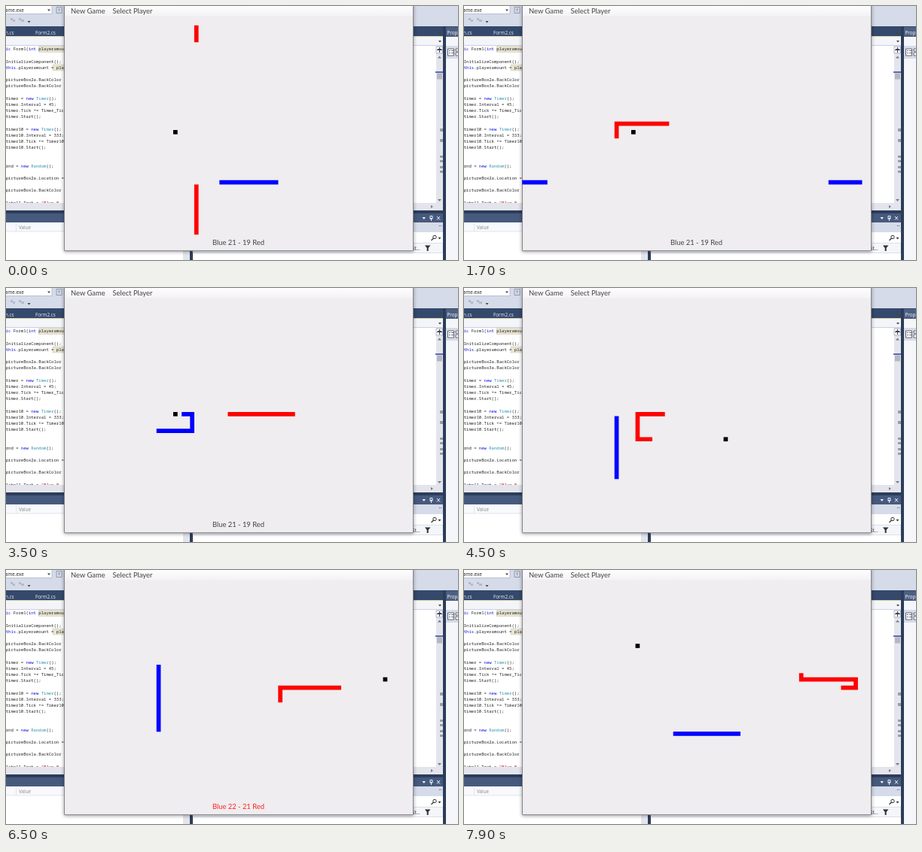
Recreate the animation shown at these times as an HTML page. Size 600 by 338 pixels, loop 8000 ms.

```html
<!DOCTYPE html>
<html lang="en">
<head>
<meta charset="utf-8">
<title>Two-player snake</title>
<style>
html, body { margin: 0; height: 100%; overflow: hidden; background: #fff; }
svg { display: block; width: 600px; height: 338px; }
text { white-space: pre; }
.code { font: 5.6px "Noto Sans Mono", "DejaVu Sans Mono", monospace; fill: #222; }
.ide { font: 6.3px "Open Sans", "Noto Sans", sans-serif; }
.app { font: 9.4px Lato, sans-serif; fill: #444; }
.kw { fill: #11d; } .type { fill: #2b91af; } .str { fill: #a31515; }
</style>
</head>
<body>
<svg viewBox="0 0 600 338">
  <defs>
    <filter id="blur" x="-10%" y="-10%" width="120%" height="120%"><feGaussianBlur stdDeviation="2.500"/></filter>
    <linearGradient id="menu" x2="0" y2="1"><stop stop-color="#fdfdfe"/><stop offset="1" stop-color="#f3f3f6"/></linearGradient>
  </defs>

  <!-- toolbar, tab strip, navigation bar -->
  <path fill="#d6dbe9" d="M0 0h600v27H0z"/>
  <path fill="#fff" stroke="#a5adc0" stroke-width=".7" d="M-2-2H61V10.500H-2z"/>
  <path fill="#34496b" d="M0 27h600v13.500H0z"/>
  <path fill="#f4f5f9" d="M0 41h580v12H0z"/>
  <path fill="#efe8c0" d="M0 40.300h580v1H0z"/>
  <path stroke="#c4cad8" stroke-width=".8" d="M0 52.500H580"/>
  <g class="ide">
    <text x="-1" y="8" fill="#222">ame.exe</text>
    <text x="-1" y="38" fill="#eef">n.cs</text>
    <text x="39" y="38" fill="#eef">Form2.cs</text>
  </g>
  <path fill="#b5bac8" d="M6 16h3v3H6zM9 18h3v3H9zM17 16h3v3h-3zM20 18h4v3h-4z"/>
  <path fill="none" stroke="#8c93a6" stroke-width=".9" d="M67 1.500h7v8h-7zm2 2.500h3m-1.500 0v3.500"/>
  <path fill="#444" d="M55 4.500h4l-2 2.500zM28.500 20h4l-2 2.500zM574 35h5l-2.500 3zM574 46h4l-2 2.500z"/>

  <!-- editor -->
  <path fill="#fff" d="M0 53h571v209H0z"/>
  <path fill="#e8e4d2" stroke="#c9c4ae" stroke-width=".5" d="M43.500 53.500h40v8h-40zM62 78h30v8H62z"/>
  <g id="code" class="code"></g>
  <path fill="#e4e5ec" d="M571 53h9v209h-9zM0 262h580v10H0z"/>
  <path fill="#f4f5f9" stroke="#8590a8" stroke-width=".6" d="M571 54h8.500v9H571z"/>
  <path stroke="#334" stroke-width=".9" d="M572 58.500h7M575.500 55v7M573 57.500h5"/>
  <path fill="#777b88" d="M573 69.500h5l-2.500-3zM573 257h5l-2.500 3zM564 265l3 2-3 2z"/>
  <path fill="#2434a0" d="M570 87.300h10v1.400h-10z"/>
  <path fill="#b4b7c2" d="M572 89.500h7v8h-7z"/>
  <path fill="#9a9ca6" d="M576 163h4v4h-4zM576 177h4v4h-4zM576 199h4v3h-4zM576 205h4v3h-4zM576 213h4v3h-4zM576 219h4v3h-4z"/>

  <!-- lower panes -->
  <path fill="#2c3d5b" d="M0 272h600v4H0z"/>
  <path fill="#465a7d" d="M0 276h580v12H0z"/>
  <path fill="#fff" d="M0 288h580v50H0z"/>
  <path fill="#f8f9fc" d="M0 288h244v12H0z"/>
  <path stroke="#d9dce5" stroke-width=".7" d="M0 300H244M13.500 289v11"/>
  <text class="ide" x="17" y="297" fill="#888">Value</text>
  <path fill="#e4e5ec" d="M235 300h9v38h-9z"/>
  <path fill="#2c3d5b" d="M244 272h4v66h-4z"/>
  <path fill="#d6dbe9" d="M248 288h332v13H248z"/>
  <path fill="#f5f6fa" stroke="#d0d4e0" stroke-width=".7" d="M248 315.500h332v13H248z"/>
  <g stroke="#eef" fill="none"><path d="M562.500 283h4m-2 0v3m-1.500-6.500v3h3v-3zM572 280l4 4.500m0-4.500l-4 4.500"/></g>
  <path fill="#eef" d="M552.500 281h4.500l-2.200 3z"/>
  <path stroke="#555" stroke-dasharray="1" d="M575 292.500h4"/>
  <circle cx="569" cy="307.500" r="2.200" fill="none" stroke="#333"/>
  <path stroke="#333" stroke-width="1.300" d="M567.500 309l-3 3"/>
  <path fill="#333" d="M573.500 308h4l-2 2.500zM556 318.500h7.500l-2.800 3.500v4h-2v-4z"/>
  <text class="ide" x="539" y="325" fill="#333">St...</text>

  <!-- properties pane -->
  <path fill="#2c3d5b" d="M580 27h4v311h-4z"/>
  <path fill="#4d6082" d="M584 28h16v13h-16z"/>
  <text class="ide" x="585.500" y="38" fill="#fff">Properties</text>
  <path fill="#f5f6fa" d="M584 41h16v297h-16z"/>
  <path fill="#d6dbe9" d="M584 53h16v17h-16z"/>
  <path fill="#fff" stroke="#445" stroke-width=".8" d="M586.500 57h8v9h-8zM588 59.500h2m1 0h3m-6 3h2m1 0h3M597 57h5v3h-5zm0 5h5v4h-5z"/>

  <!-- game window -->
  <path fill="#000" opacity=".4" filter="url(#blur)" d="M77-9h464v336H77z"/>
  <path fill="#efedef" stroke="#85868c" d="M77.500-9h463v334.700h-463z"/>
  <path fill="url(#menu)" d="M78 0h462v13.500H78z"/>
  <g class="app">
    <text x="86" y="9.500">New Game</text>
    <text x="141.500" y="9.500">Select Player</text>
    <text id="score" x="308.500" y="317.500" text-anchor="middle"></text>
  </g>
  <path id="food" fill="#000"/>
  <path id="blue" fill="#00f"/>
  <path id="red" fill="#f00"/>
</svg>
<script>
const $ = id => document.getElementById(id);

// Each entry: line number, then text
const lines = [
  [0, 'ic Form1(int playeramount)'], [2, 'InitializeComponent();'], [3, 'this.playeramount = playeramount;'],
  [5, 'pictureBox2a.BackColor ='], [6, 'pictureBox3a.BackColor ='],
  [8, 'timer = new Timer();'], [9, 'timer.Interval = 45;'], [10, 'timer.Tick += Timer_Tick;'], [11, 'timer.Start();'],
  [13, 'timer10 = new Timer();'], [14, 'timer10.Interval = 333;'], [15, 'timer10.Tick += Timer10_Tick;'], [16, 'timer10.Start();'],
  [19, 'rnd = new Random();'], [21, 'pictureBox2a.Location ='], [23, 'pictureBox1a.BackColor ='], [25, 'label1.Text = "Blue 0 - 0 Red";']
];
const paint = s => s.replace(/".*"|\b(?:int|this|new|ic)\b|\b(?:Timer|Random)(?=\()/g, w =>
  `<tspan class="${w[0] === '"' ? 'str' : /^[TR]/.test(w) ? 'type' : 'kw'}">${w}</tspan>`);
$('code').innerHTML = lines.map(([n, s]) =>
  `<text x="-.3" y="${59.2 + n * 8.18}">${paint(s)}</text>`).join('');

const LOOP = 8000, FRAME = 100, TICK = 46.85, PHASE = .7, BLINK = 343.75;
const CELL = 5.57, LEAD = 16;

// Unrolls moves such as "U26 L9" into the cells the head visits
function walk(x, y, moves) {
  const cells = [[x, y]];
  for (const move of moves.split(' ')) {
    for (let n = +move.slice(1); n--;) {
      if (move[0] === 'R') x = (x + 1) % 81;
      if (move[0] === 'L') x = (x + 80) % 81;
      if (move[0] === 'U') y = y > 2 ? y - 1 : 51;
      if (move[0] === 'D') y = y < 50 ? y + 1 : 1;
      cells.push([x, y]);
    }
  }
  return cells;
}
const redPath = walk(31, 6, 'U26 L9 U5 R33 D2 L28 D6 R24 U8 R28 U2 L13 U1');
const bluePath = walk(34, 39, 'R56 U8 R21 U4 L8 D59 R29');
const foods = [[26, 27], [48, 33], [62, 25], [76, 23], [27, 15]];
const meals = [77, 114, 136, 158];   // blue eats first, red the rest

const draw = (id, cells) => $(id).setAttribute('d', cells.map(([x, y]) =>
  `M${(77.2 + x * CELL).toFixed(2)} ${(14.6 + y * CELL).toFixed(2)}h5.7v5.7h-5.7z`).join(''));

function render(t) {
  const ticks = t / TICK + PHASE, step = Math.floor(ticks), part = ticks - step;
  const eaten = meals.filter(m => step >= m).length;
  const blueEaten = Math.min(eaten, 1), redEaten = eaten - blueEaten;
  // The old tail cell is cleared a moment after the head moves
  const snake = (path, length, lag) => {
    const end = step + LEAD + 1;
    return path.slice(Math.max(0, end - length - (part < lag)), end);
  };
  draw('red', snake(redPath, 16 + redEaten, .4));
  draw('blue', snake(bluePath, 14 + blueEaten, .51));
  draw('food', [foods[eaten]]);

  const hidden = eaten && Math.floor((t - 4445) / BLINK) % 2 === 0;
  $('score').textContent = hidden ? '' : `Blue ${21 + blueEaten} - ${19 + redEaten} Red`;
  $('score').style.fill = redEaten ? '#f22' : eaten ? '#22f' : '#444';
}

const start = performance.now();
function loop() {
  const t = (performance.now() - start) % LOOP;
  render(Math.floor(t / FRAME) * FRAME);
  requestAnimationFrame(loop);
}
loop();
</script>
</body>
</html>
```
